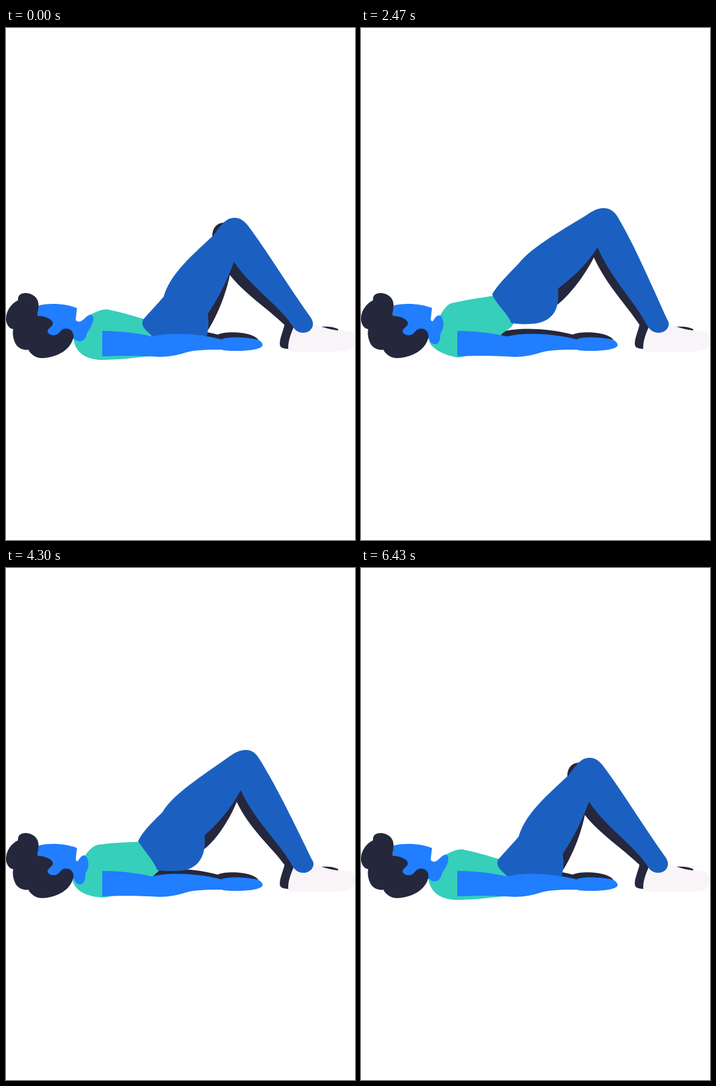
Recreate the animation shown at these times as an HTML page. Size 580x850 px, loop 6460 ms.

```html
<!DOCTYPE html>
<html lang="en">
<head>
<meta charset="utf-8">
<title>Glute bridge</title>
<style>
  html, body { margin: 0; width: 100%; height: 100%; overflow: hidden; background: #fff; }
  svg { display: block; width: 100%; height: 100%; }
  .dark { fill: #25273d; }
  .skin { fill: #207eff; }
  .pants { fill: #1b60c1; }
  .shirt { fill: #36cfba; }
  .shoe { fill: #f8f4f8; }
</style>
</head>
<body>
<svg viewBox="0 0 580 850">
  <!-- far side -->
  <path class="dark" d="M226,508 C240,498 300,495 352,509 C365,503 395,505 408,510 C416,513 420,517 420,520 L358,525 L240,520Z"/>
  <path class="dark" d="M463,492 C460,505 455,515 455,524 C455,531 460,532 470,533 L485,500Z M522,496 C534,495 546,496 552,500 L552,506Z"/>
  <path class="dark"
    data-low="M343,345 C343,332 350,323 364,323 C380,322 400,340 410,350 C440,400 465,450 490,490 C485,500 470,500 463,493 C435,466 395,440 372,410 C366,440 352,476 336,501 C330,500 325,490 325,480 C320,440 330,380 343,345Z"
    data-mid="M370,335 C375,325 385,315 396,315 C405,315 412,325 415,335 C440,390 470,450 490,490 C485,500 470,500 463,493 C440,463 403,435 382,391 C372,420 350,455 331,469 C325,470 322,455 322,440 C335,410 355,370 370,335Z"
    data-high="M375,335 C380,325 390,312 402,312 C412,312 418,325 420,335 C442,390 470,450 490,490 C485,500 470,500 463,493 C440,458 410,430 387,381 C372,410 350,440 327,459 C322,455 318,440 318,430 C335,400 355,370 375,335Z"/>

  <!-- torso -->
  <path class="shirt"
    data-low="M112,516 C114,505 128,482 140,476 C150,471 158,467 168,467 C188,471 212,478 232,484 C236,492 240,502 244,512 C244,525 244,540 240,545 C215,547 190,551 158,551 C130,550 115,537 112,516Z"
    data-mid="M110,519 C114,505 124,490 131,478 C138,468 146,461 156,460 C180,458 200,458 225,458 C236,475 247,490 255,507 C250,510 245,515 240,520 C215,530 180,547 160,547 C138,547 115,540 110,519Z"
    data-high="M113,519 C114,505 122,492 131,478 C137,468 143,459 150,457 C175,451 200,448 222,444 C230,460 245,478 253,490 C254,495 245,500 235,507 C215,530 180,547 160,547 C142,544 117,534 113,519Z"/>

  <!-- head -->
  <path class="skin" d="M53,461 C70,456 100,457 118,465 L116,482 C115,487 119,487 124,488 L126,510 L114,516 L100,515 L72,520 L53,478Z"/>
  <path class="skin"
    data-low="M121,488 C129,487 133,477 140,476 C146,476 146,483 144,489 C142,496 138,501 135,506 C133,514 130,520 123,520 C117,520 113,518 113,511 C113,502 112,496 121,488Z"
    data-mid="M119,487 C122,483 125,477 130,477 C135,478 137,486 137,492 C137,500 134,503 132,507 C132,517 130,525 123,525 C117,525 113,520 113,513 C113,502 114,494 119,487Z"
    data-high="M119,487 C122,483 125,477 130,477 C135,478 137,486 137,492 C137,500 134,503 132,507 C132,517 130,525 123,525 C117,525 113,520 113,513 C113,502 114,494 119,487Z"/>
  <path class="dark" d="M20,452 C19,444 25,440 32,440 C45,440 54,449 54,459 C54,468 52,473 53,478 C66,478 77,484 78,490 C78,496 69,498 69,504 C71,510 80,512 86,508 C92,503 92,499 100,499 C108,499 113,505 112,514 C108,532 88,547 60,548 C48,548 40,540 37,534 C28,536 17,530 14,520 C11,512 11,505 12,500 C4,499 0,490 0,483 C0,470 8,458 20,452Z"/>

  <!-- near side -->
  <path class="shoe" d="M478,497 C473,508 469,520 469,530 C469,536 471,537.5 478,537.5 L545,537.5 C565,537 580,534 580,522 C580,510 578,504 566,503 C548,503 530,499 512,491Z"/>
  <path class="pants"
    data-low="M228,484 C240,470 252,458 262,446 C272,412 300,385 344,345 C356,330 364,315 380,315 C393,315 400,325 408,336 C440,380 470,430 506,480 C516,494 506,506 494,506 C484,506 479,500 475,493 C455,462 405,428 379,388 C367,420 354,447 335,475 C338,488 336,500 334,511 C300,516 260,514 243,512 C236,504 222,496 228,484Z"
    data-mid="M220,458 C227,441 245,425 259,411 C273,384 310,358 360,321 C370,313 383,303 397,303 C410,303 416,313 422,323 C447,363 480,427 508,484 C516,494 506,506 494,506 C484,506 479,500 475,493 C453,455 415,425 389,371 C374,400 352,430 331,448 C334,475 325,500 300,506 C290,508 268,508 252,506 C246,490 230,472 220,458Z"
    data-high="M218,442 C228,425 249,405 263,390 C280,369 309,350 371,313 C382,306 390,299 404,299 C416,299 424,308 429,318 C455,362 482,425 509,484 C516,494 507,506 495,506 C485,506 479,500 475,493 C453,451 416,417 393,364 C376,393 350,415 327,433 C331,462 322,488 285,491 C275,492 262,492 250,490 C244,474 224,458 218,442Z"/>
  <path class="skin" d="M160,503 C190,503 215,506 242,512 C275,504 325,508 358,517 C372,511 400,514 417,517 C424,519 428,525 426,528 C422,534 400,536 385,536 C375,536 365,536 358,534 C335,534 315,534 298,539 C285,543 272,546 255,546 C225,544 190,544 160,545Z"/>
</svg>
<script>
  const LOOP = 6460, REPS = 4, MID = 0.6;
  const numbers = /\d+(\.\d+)?/g;
  const parts = [...document.querySelectorAll('[data-low]')].map(el => ({
    el,
    shape: el.dataset.low,
    keys: ['low', 'mid', 'high'].map(k => el.dataset[k].match(numbers).map(Number))
  }));

  const ease = (x, from, to) => {
    const u = Math.min(1, Math.max(0, (x - from) / (to - from)));
    return u * u * (3 - 2 * u);
  };

  // 0 = hips on the floor, 1 = full bridge
  const lift = t => {
    const phase = t % LOOP / LOOP * REPS % 1;
    return ease(phase, 0.065, 0.355) - ease(phase, 0.56, 0.85);
  };

  function pose(p) {
    const first = p < MID ? 0 : 1;
    const u = first ? (p - MID) / (1 - MID) : p / MID;
    for (const { el, shape, keys } of parts) {
      const a = keys[first], b = keys[first + 1];
      let i = 0;
      el.setAttribute('d', shape.replace(numbers, () => {
        const v = a[i] + (b[i] - a[i]) * u;
        i++;
        return v.toFixed(2);
      }));
    }
  }

  const start = performance.now();
  function frame() {
    pose(lift(performance.now() - start));
    requestAnimationFrame(frame);
  }
  frame();
</script>
</body>
</html>
```
